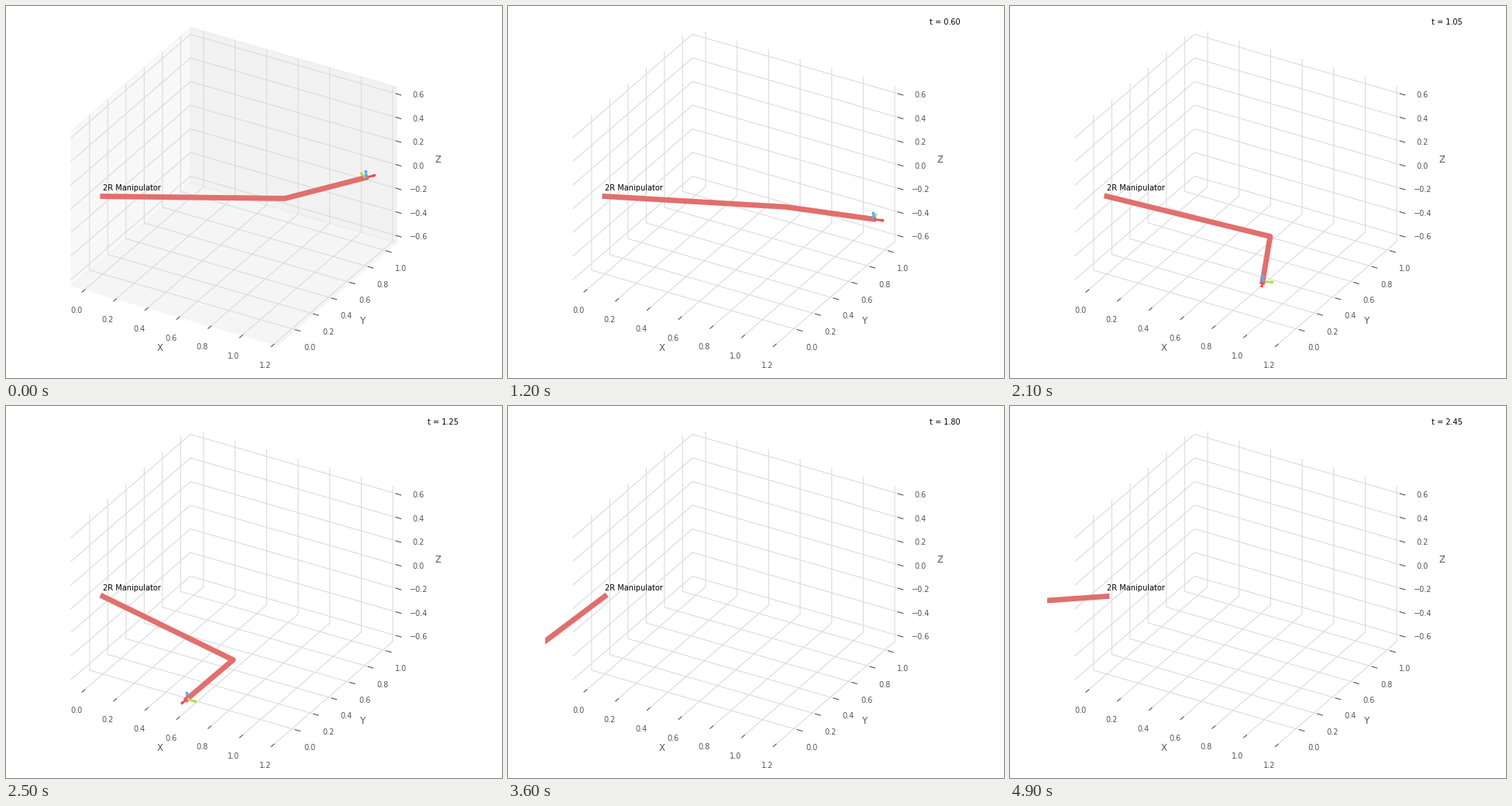
A matplotlib script that plays this animation: 640x480 px, repeating every 5 s.

```python
import numpy as np
import matplotlib.pyplot as plt
from matplotlib.animation import FuncAnimation

FRAMES, INTERVAL, DT = 50, 100, 0.05
LINK_1, LINK_2, AXIS_LENGTH = 1.0, 0.5, 0.06
ARM_COLOR = "#E16F6D"
FRAME_COLORS = ("#F84752", "#BADA55", "#54AEFF")

plt.rcParams.update({
    "font.family": "DejaVu Sans", "font.size": 7,
    "axes.labelsize": "large", "axes.labelpad": 1, "axes.labelcolor": "#555555",
    "axes.edgecolor": "white", "axes.linewidth": 1, "axes.axisbelow": True,
    "xtick.color": "#555555", "ytick.color": "#555555",
    "grid.color": "#dbdbdb", "grid.linestyle": "-",
})

# A few poses of the falling arm: seconds, and absolute link angles in radians
TIMES = (0, 0.4, 0.8, 1.25, 1.45, 1.8, 2.45)
SHOULDER = (0.5, 0.442, 0.319, -0.249, -0.682, -1.634, -2.478)
FOREARM = (1.0, 0.731, -0.332, -1.58, -1.627, -0.803, -0.262)


def smooth_path(times, values):
    """Smooth curve through the values that starts at rest."""
    slopes = np.gradient(values, times)
    slopes[0] = 0

    def at(t):
        i = min(np.searchsorted(times, t, side="right"), len(times) - 1) - 1
        h = times[i + 1] - times[i]
        s = (t - times[i]) / h
        ease = s * s * (3 - 2 * s)
        bend = h * s * (1 - s) * (slopes[i] * (1 - s) - slopes[i + 1] * s)
        return values[i] + (values[i + 1] - values[i]) * ease + bend

    return at


shoulder_at = smooth_path(TIMES, SHOULDER)
forearm_at = smooth_path(TIMES, FOREARM)


def direction(angle):
    return np.array([np.cos(angle), np.sin(angle), 0.0])


def pose(t):
    heading = forearm_at(t)
    elbow = LINK_1 * direction(shoulder_at(t))
    return elbow, elbow + LINK_2 * direction(heading), heading


fig = plt.figure(figsize=(6.4, 4.8), dpi=100, facecolor="white")
ax = fig.add_subplot(projection="3d", proj_type="ortho")
fig.subplots_adjust(left=-0.09, bottom=0, right=0.99, top=1)
ax.set_facecolor("white")

arm, = ax.plot([0], [0], [0], color=ARM_COLOR, linewidth=5)
ax.text(0, 0, 0.05, "2R Manipulator")
timer = fig.text(0.85, 0.95, "")

# Equal ranges that hold the starting pose, with margins
reach = pose(0)[1]
half = reach[0] / 2 * 1.1 * 25 / 24
mid_x, mid_y = reach[:2] / 2
ax.set_xticks(np.arange(7) / 5)
ax.set_yticks(np.arange(6) / 5)
ax.set_zticks(np.arange(-3, 4) / 5)
ax.set_xlim(mid_x - half, mid_x + half)
ax.set_ylim(mid_y - half, mid_y + half)
ax.set_zlim(-half, half)
ax.set_xlabel("X")
ax.set_ylabel("Y")
ax.set_zlabel("Z")

arrows = []


def update(frame):
    t = frame * DT
    elbow, tip, heading = pose(t)
    arm.set_data_3d(*np.array([np.zeros(3), elbow, tip]).T)

    while arrows:
        arrows.pop().remove()
    axes = (direction(heading), direction(heading + np.pi / 2), np.array([0, 0, 1.0]))
    for vector, color in zip(axes, FRAME_COLORS):
        arrows.append(ax.quiver(*tip, *vector, length=AXIS_LENGTH,
                                color=color, linewidth=2))

    # The shaded walls show only at the start
    for axis in (ax.xaxis, ax.yaxis, ax.zaxis):
        axis.pane.set_visible(frame == 0)
    timer.set_text(f"t = {t:.2f}" if frame else "")
    return [arm, timer, *arrows]


animation = FuncAnimation(fig, update, frames=FRAMES, interval=INTERVAL,
                          repeat=True, blit=False)
plt.show()
```
